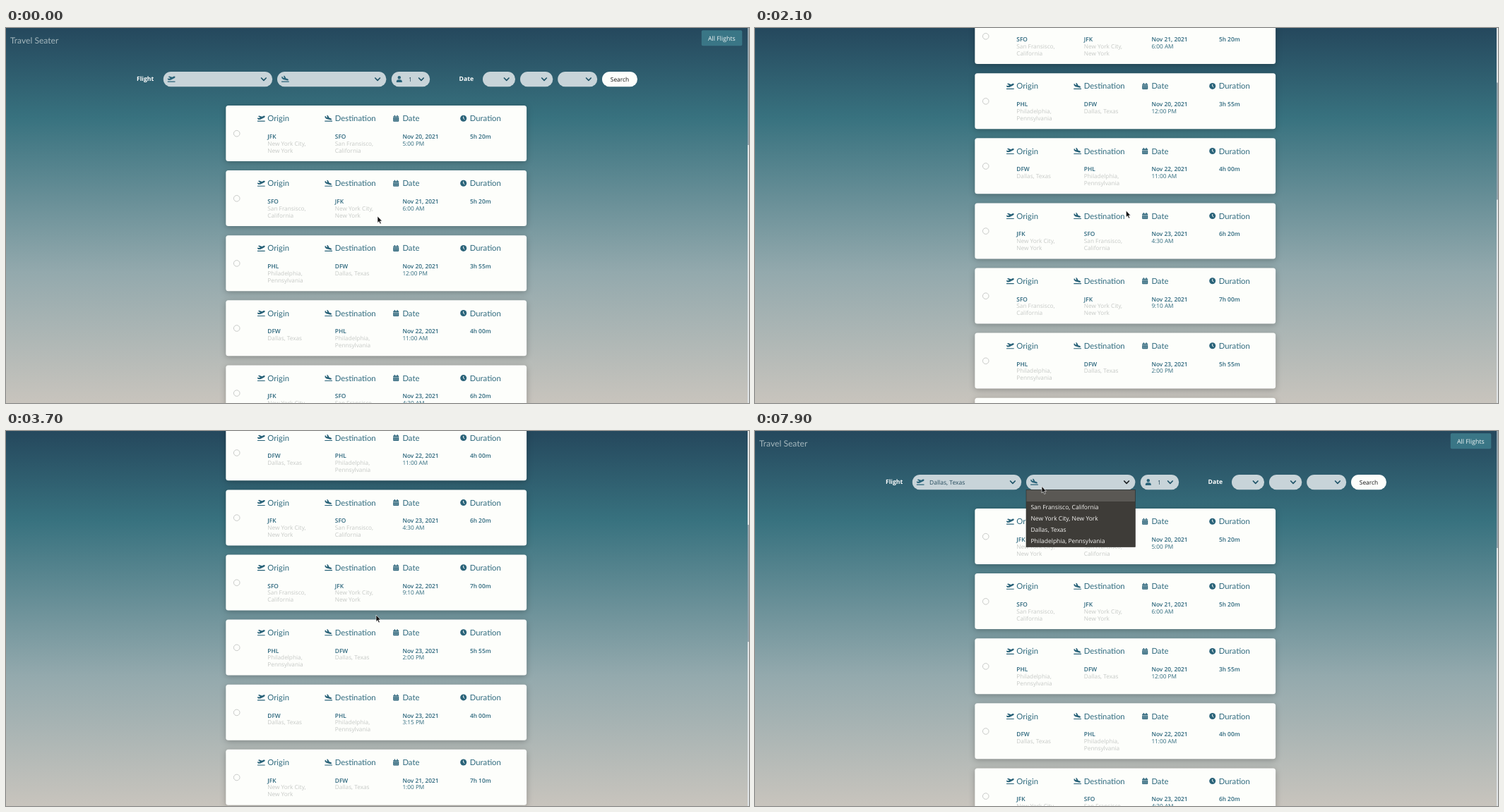
Animation, 1052 px wide and 532 px high, one loop 8000 ms. Source, as an HTML page:

```html
<!DOCTYPE html>
<html lang="en">
<head>
<meta charset="utf-8">
<title>Flights</title>
<style>
html, body { margin: 0; width: 100%; height: 100%; overflow: hidden; }
body { background: linear-gradient(#25485d, #38727f 24%, #93a9ad 65%, #c8c4bd); }
svg { display: block; width: 100vw; height: 100vh; }
text { font: 8.25px "Open Sans", "Noto Sans", sans-serif; text-rendering: geometricPrecision; white-space: pre; }
.brand { font: 12.1px Lato, sans-serif; fill: #a3b6bc; }
.card { fill: #fdfefb; filter: drop-shadow(0 2px 4px rgba(0, 0, 0, .25)); }
.radio { fill: #fdfefb; stroke: #c9cbc9; stroke-width: 1; }
.head { font: 11.3px Lato, sans-serif; fill: #2f6a7e; }
.icon { fill: #2a6379; }
.strong { font-size: 8.35px; font-weight: 600; fill: #2b667c; }
.time { fill: #2f6a7e; }
.city { fill: #c6c9c6; }
.label { font-size: 8.65px; font-weight: 700; fill: #fff; }
.pill { fill: #c8d4d9; }
.chev { fill: none; stroke: #215468; stroke-width: 1.7; stroke-linecap: round; stroke-linejoin: round; }
.chev.on { stroke: #1c2124; }
.value { font-size: 8.5px; fill: #24495b; }
.item { font-size: 8.5px; fill: #f6f5f3; }
</style>
</head>
<body>
<svg id="stage" viewBox="0 0 1052 532">
  <defs>
    <path id="depart" transform="scale(.0176)" d="M16 448h608v64H16zM80 341L4 258l46-44 22-4 66 36 103-52L85 96l6-29 54-27 18 1 219 82 98-50c60-30 130-28 145 8 12 30-20 90-80 122L265 345l-160 7z"/>
    <path id="land" transform="scale(.0176)" d="M16 448h608v64H16zM45 206l89 80 25 14 288 78c70 18 122-4 128-36 6-40-45-82-94-95l-98-27L283 30l-12-12L206 1l-21 16 48 164-102-28-28-68-11-9-39-11-21 16v101z"/>
    <g id="date">
      <path d="M1.6 0h1.3v1.5h2.3V0h1.3v1.5h1.5v1.4H0V1.5h1.6zM0 3.4h8v4.8q0 .8-.8.8H.8Q0 9 0 8.2z"/>
      <path d="M1.3 5h5.4M1.3 7.2h5.4" stroke="#fdfefb" stroke-width=".9" stroke-dasharray="1.1 1.05"/>
    </g>
    <g id="clock">
      <circle cx="4.5" cy="4.5" r="4.5"/>
      <path d="M4.5 1.9v2.8l1.7 1.3" fill="none" stroke="#fdfefb"/>
    </g>
    <path id="user" d="M4 0a2.2 2.2 0 0 1 0 4.5A2.2 2.2 0 0 1 4 0zM2.4 5.2h3.2Q8 5.4 8 7.8V9H0V7.8Q0 5.4 2.4 5.2z"/>
  </defs>
  <g id="page"></g>
  <g id="menu"></g>
  <rect x="1050" width="2" height="532" fill="#dfe3e5"/>
  <rect id="thumb" x="1050" width="2" height="166" fill="#94a4ad"/>
  <path id="cursor" d="M0 0v9.4l2.1-1.9 1.6 3.5 1.6-.8-1.6-3.3h2.8z" fill="#111" stroke="#fff" stroke-width=".6"/>
</svg>
<script>
const $ = id => document.getElementById(id);
const LOOP = 8000, TICK = 100, PITCH = 92.1, ROW = 16, MENU_TOP = 84;

const cities = {
  SFO: ['San Fransisco,', 'California'],
  JFK: ['New York City,', 'New York'],
  DFW: ['Dallas, Texas'],
  PHL: ['Philadelphia,', 'Pennsylvania']
};
const options = Object.values(cities).map(lines => lines.join(' '));

// from, to, day in November, time, duration
const flights = `JFK SFO 20 5:00_PM 5h_20m
SFO JFK 21 6:00_AM 5h_20m
PHL DFW 20 12:00_PM 3h_55m
DFW PHL 22 11:00_AM 4h_00m
JFK SFO 23 4:30_AM 6h_20m
SFO JFK 22 9:10_AM 7h_00m
PHL DFW 23 2:00_PM 5h_55m
DFW PHL 23 3:15_PM 4h_00m
JFK DFW 21 1:00_PM 7h_10m
DFW JFK 22 8:00_AM 6h_30m
SFO PHL 21 10:20_AM 5h_40m
PHL SFO 23 7:45_AM 6h_15m
JFK PHL 20 3:30_PM 1h_20m
PHL JFK 22 6:10_PM 1h_25m
SFO DFW 23 9:00_AM 3h_40m
DFW SFO 24 1:30_PM 4h_05m`.split('\n').map(line => line.split(' ').map(s => s.replace('_', ' ')));

const text = (x, y, s, cls) => `<text x="${x}" y="${y}" class="${cls}">${s}</text>`;
const icon = (id, x, y) => `<use href="#${id}" x="${x}" y="${y}" class="icon"/>`;
const box = (x, y, w, h, r, attrs) => `<rect x="${x}" y="${y}" width="${w}" height="${h}" rx="${r}" ${attrs}/>`;
const place = (x, code) => text(x, 47, code, 'strong') +
  cities[code].map((line, i) => text(x, 56.7 + i * 10, line, 'city')).join('');

function card([from, to, day, time, length], i) {
  return `<g transform="translate(0 ${110 + i * PITCH})">` +
    box(311.3, 0, 425.8, 79, 3.5, 'class="card"') +
    '<circle cx="326.7" cy="39.7" r="4.3" class="radio"/>' +
    icon('depart', 355.7, 13.7) + text(370.3, 22.3, 'Origin', 'head') +
    icon('land', 451, 13.7) + text(465.8, 22.3, 'Destination', 'head') +
    icon('date', 548.2, 13.7) + text(561.4, 22.3, 'Date', 'head') +
    icon('clock', 643.2, 13.7) + text(656.8, 22.3, 'Duration', 'head') +
    place(370.3, from) + place(465.8, to) +
    text(561.4, 47, `Nov ${day}, 2021`, 'strong') + text(561.4, 56.7, time, 'time') +
    text(656.9, 47, length, 'strong') + '</g>';
}

const select = (x, w) => box(x, 62, w, 21.3, 10.6, 'class="pill"') +
  `<path class="chev" d="M${x + w - 15.6} 71l3.3 3.3 3.3-3.3"/>`;

$('page').innerHTML =
  text(6, 21.5, 'Travel Seater', 'brand') +
  box(984.8, 3.2, 57.5, 22, 2, 'fill="#3a7686"') +
  '<text x="994" y="18" style="font-size:8.8px" fill="#f0f5f5">All Flights</text>' +
  text(185, 74.8, 'Flight', 'label') + text(641.6, 74.8, 'Date', 'label') +
  [[222.8, 154.4], [384, 154.4], [545.8, 54.4], [675, 46], [728, 46.3], [781.2, 56]]
    .map(s => select(...s)).join('') +
  icon('depart', 228.5, 67.7) + icon('land', 389.8, 67.7) + icon('user', 552.8, 68) +
  text(570, 75.8, '1', 'value') +
  '<text id="chosen" x="247" y="75.6" class="value">Dallas, Texas</text>' +
  box(844, 62, 50, 21.3, 10.6, 'fill="#fdfefb"') +
  '<text x="855.8" y="75.7" style="font-size:8.4px" fill="#111">Search</text>' +
  flights.map(card).join('');

$('menu').innerHTML =
  box(0, MENU_TOP - .5, 154.4, 5 * ROW + 1, 0, 'fill="#3e3c38" stroke="#2f2e2b" stroke-width=".6"') +
  box(.4, 0, 153.6, ROW, 0, 'id="hover" fill="#5a5854"') +
  options.map((s, i) => text(6.4, MENU_TOP + 27 + i * ROW, s, 'item')).join('');

const chevrons = document.querySelectorAll('.chev');

// keys: [time, ...values], linear between
function track(keys, t) {
  const i = keys.findLastIndex(k => k[0] <= t), a = keys[i], b = keys[i + 1];
  if (!b) return a.slice(1);
  const p = (t - a[0]) / (b[0] - a[0]);
  return a.slice(1).map((v, n) => v + (b[n + 1] - v) * p);
}

const scrollKeys = [
  [0, 0], [1100, 0], [1300, 44], [1500, 109], [1700, 175], [1800, 190], [1900, 190],
  [2100, 230], [2500, 365], [2700, 392], [2800, 395], [3100, 430.3], [3400, 555],
  [3500, 570], [3600, 570], [3800, 220], [4000, 0]
];
const cursorKeys = [
  [0, 526, 267], [900, 526, 267], [1000, 525.8, 259], [1900, 525.6, 259], [2500, 525, 259],
  [2800, 525, 259], [3100, 524, 261], [4200, 524, 261], [4300, 524.5, 253], [5000, 346, 78],
  [5600, 346, 78], [6000, 345.6, 110.8], [6100, 345.6, 110.8], [6500, 341, 139],
  [7100, 341, 139], [7700, 406, 78.5]
];

function draw(t) {
  const [scroll] = track(scrollKeys, t), [x, y] = track(cursorKeys, t);
  const open = t >= 5200 && t < 7200 ? 0 : t >= 7800 ? 1 : -1;
  const row = Math.max(0, Math.min(4, Math.floor((y + 6 - MENU_TOP) / ROW)));
  $('page').setAttribute('transform', `translate(0 ${-scroll})`);
  $('thumb').setAttribute('y', scroll * .337);
  $('cursor').setAttribute('transform', `translate(${x} ${y})`);
  $('chosen').style.display = t >= 7200 ? '' : 'none';
  $('menu').style.display = open < 0 ? 'none' : '';
  $('menu').setAttribute('transform', `translate(${open ? 384 : 222.8} 0)`);
  $('hover').setAttribute('y', MENU_TOP + row * ROW);
  chevrons.forEach((c, i) => c.classList.toggle('on', i === open));
}

const start = performance.now();
function frame() {
  const t = (performance.now() - start) % LOOP;
  draw(Math.floor(t / TICK) * TICK);
  requestAnimationFrame(frame);
}
frame();
</script>
</body>
</html>
```
